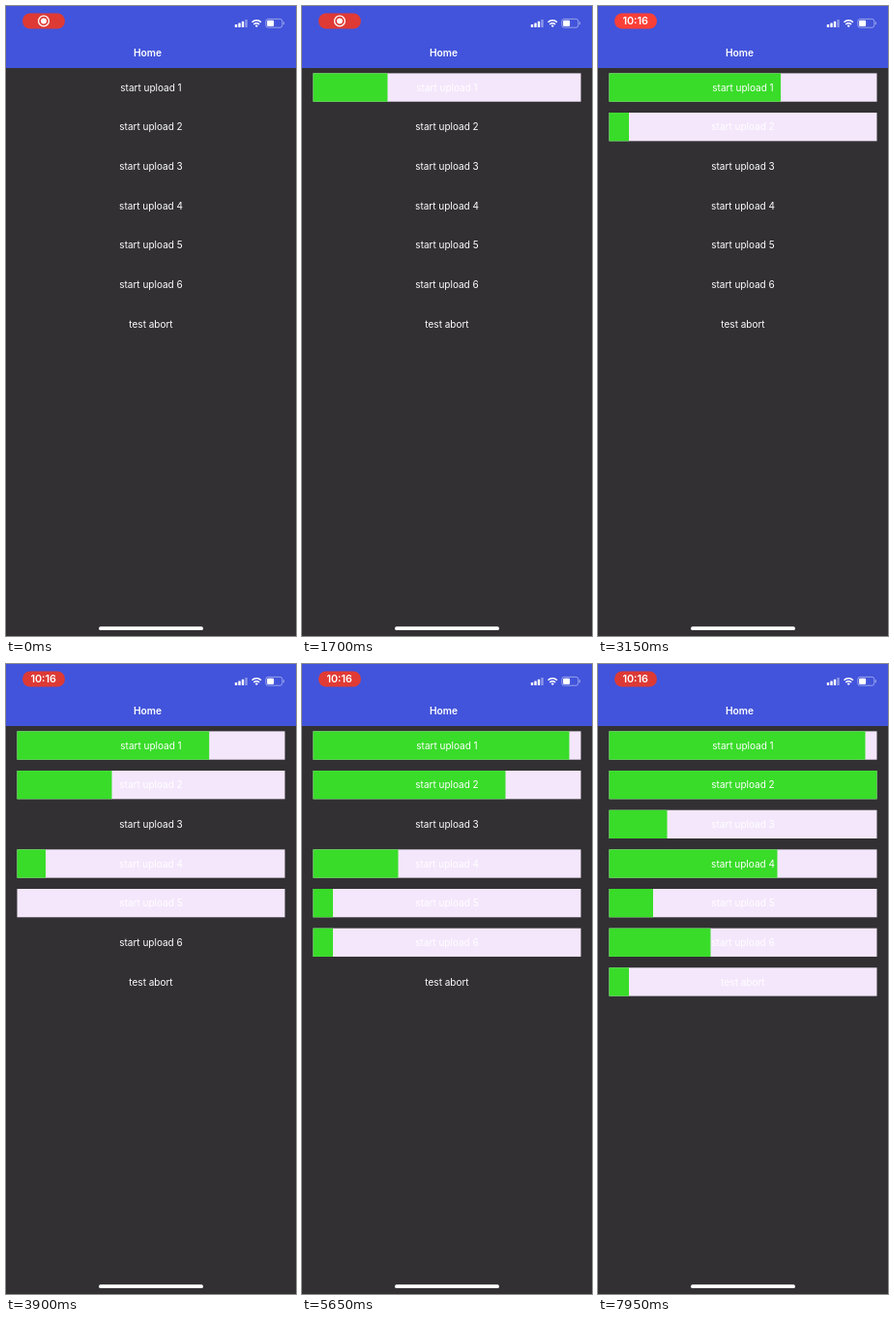
Recreate the animation shown at these times as an HTML page. Size 300 px wide and 650 px high, loop 8 s.

```html
<!DOCTYPE html>
<html lang="en">
<head>
<meta charset="utf-8">
<title>Uploads</title>
<style>
html, body { margin: 0; width: 100%; height: 100%; overflow: hidden; background: #323033; }
svg { display: block; width: 300px; height: 650px; }
text { font: 400 10px Inter, sans-serif; fill: #fff; text-anchor: middle; }
.title { font-weight: 600; font-size: 10.2px; }
.clock { font-weight: 600; font-size: 10.8px; }
</style>
</head>
<body>
<svg viewBox="0 0 300 650">
  <rect width="300" height="650" fill="#323033"/>
  <rect width="300" height="64" fill="#4254db"/>
  <rect id="pill" x="17" y="7.5" width="44" height="16" rx="8" fill="#dd3a35"/>
  <g id="record" fill="#fff">
    <circle cx="39" cy="15.5" r="5.4" fill="none" stroke="#fff" stroke-width="1.3"/>
    <circle cx="39" cy="15.5" r="3"/>
  </g>
  <text id="clock" class="clock" x="38.7" y="19.4">10:16</text>
  <g fill="#fff">
    <rect x="236.8" y="19" width="2.4" height="3" rx=".6"/>
    <rect x="240.3" y="17.5" width="2.4" height="4.5" rx=".6"/>
    <rect x="243.8" y="15.8" width="2.4" height="6.2" rx=".6"/>
    <rect x="247.3" y="14" width="2.4" height="8" rx=".6" opacity=".4"/>
  </g>
  <g fill="none" stroke="#fff" stroke-width="1.5">
    <path d="M254.5 16.7a6.5 6.5 0 0 1 9.4 0M256.3 18.9a4 4 0 0 1 5.8 0"/>
    <path d="M257.6 20.3a2.2 2.2 0 0 1 3.2 0L259.2 22z" fill="#fff" stroke="none"/>
  </g>
  <rect x="268.8" y="13.4" width="17" height="8.8" rx="2.4" fill="none" stroke="#fff" stroke-opacity=".5" stroke-width=".9"/>
  <rect x="270.1" y="14.7" width="7" height="6.2" rx="1.2" fill="#fff"/>
  <rect x="286.7" y="16.3" width="1.1" height="3" rx=".5" fill="#fff" opacity=".5"/>
  <text class="title" x="146.5" y="51.7">Home</text>
  <g id="rows"></g>
  <rect x="96" y="640.3" width="108" height="3.8" rx="1.9" fill="#fff"/>
</svg>
<script>
const LOOP = 8000, LEFT = 11.5, WIDTH = 277, TOP = 69.4, PITCH = 40.65, HEIGHT = 29.3;
const FIRST = 20.5; // width of the first uploaded chunk
const HOLD = 'steps(1, end)';

// start: when the bar appears; steps: [time, filled width, jumps until the next entry]
const uploads = [
  { label: 'start upload 1', start: 600, steps: [[700, FIRST, 4], [1700, 77, 6], [3150, 177.5, 5], [4600, 230.5, 4], [5600, 265, 1]] },
  { label: 'start upload 2', start: 2250, steps: [[2350, FIRST, 1], [3200, FIRST, 6], [4600, 175.5, 4], [5650, 199, 5], [6900, WIDTH, 1]] },
  { label: 'start upload 3', start: 6500, steps: [[6600, FIRST, 1], [7000, FIRST, 4], [7900, 60, 1]] },
  { label: 'start upload 4', start: 3250, steps: [[3350, FIRST, 4], [4600, 56.5, 4], [5650, 88, 5], [6950, 125.5, 4], [7950, 174, 1]] },
  { label: 'start upload 5', start: 3900, steps: [[4000, FIRST, 1], [6300, 31.5, 1], [7000, 31.5, 2], [7900, 45.5, 1]] },
  { label: 'start upload 6', start: 5250, steps: [[5350, FIRST, 1], [6400, 31.5, 1], [7000, 31.5, 5], [7950, 105, 1]] },
  { label: 'test abort', start: 7350, steps: [[7450, FIRST, 1]] }
];

const rows = document.getElementById('rows');
const loop = (el, frames) => el.animate(frames, { duration: LOOP, iterations: Infinity });

function add(tag, attrs) {
  const el = document.createElementNS('http://www.w3.org/2000/svg', tag);
  for (const name in attrs) el.setAttribute(name, attrs[name]);
  return rows.appendChild(el);
}

function switchAt(el, time, from, to) {
  loop(el, [
    { opacity: from, offset: 0, easing: HOLD },
    { opacity: to, offset: time / LOOP, easing: HOLD },
    { opacity: to, offset: 1 }
  ]);
}

uploads.forEach(({ label, start, steps }, i) => {
  const y = TOP + i * PITCH;
  const box = { x: LEFT, y, width: WIDTH, height: HEIGHT };
  const track = add('rect', { ...box, fill: '#f4e7fc' });
  const fill = add('rect', { ...box, fill: '#39dc29' });
  add('text', { x: 150, y: y + 18.4 }).textContent = label;

  switchAt(track, start, 0, 1);
  const last = steps[steps.length - 1][1];
  loop(fill, [
    { width: '0px', offset: 0, easing: HOLD },
    ...steps.map(([time, width, jumps]) => ({
      width: width + 'px', offset: time / LOOP, easing: `steps(${jumps}, end)`
    })),
    { width: last + 'px', offset: 1 }
  ]);
});

switchAt(document.getElementById('record'), 2100, 1, 0);
switchAt(document.getElementById('clock'), 2100, 0, 1);
document.getElementById('pill').animate(
  [{ fill: '#dd3a35' }, { fill: '#ff4038' }],
  { duration: 1000, delay: -125, iterations: Infinity, direction: 'alternate', easing: 'ease-in-out' }
);
</script>
</body>
</html>
```
